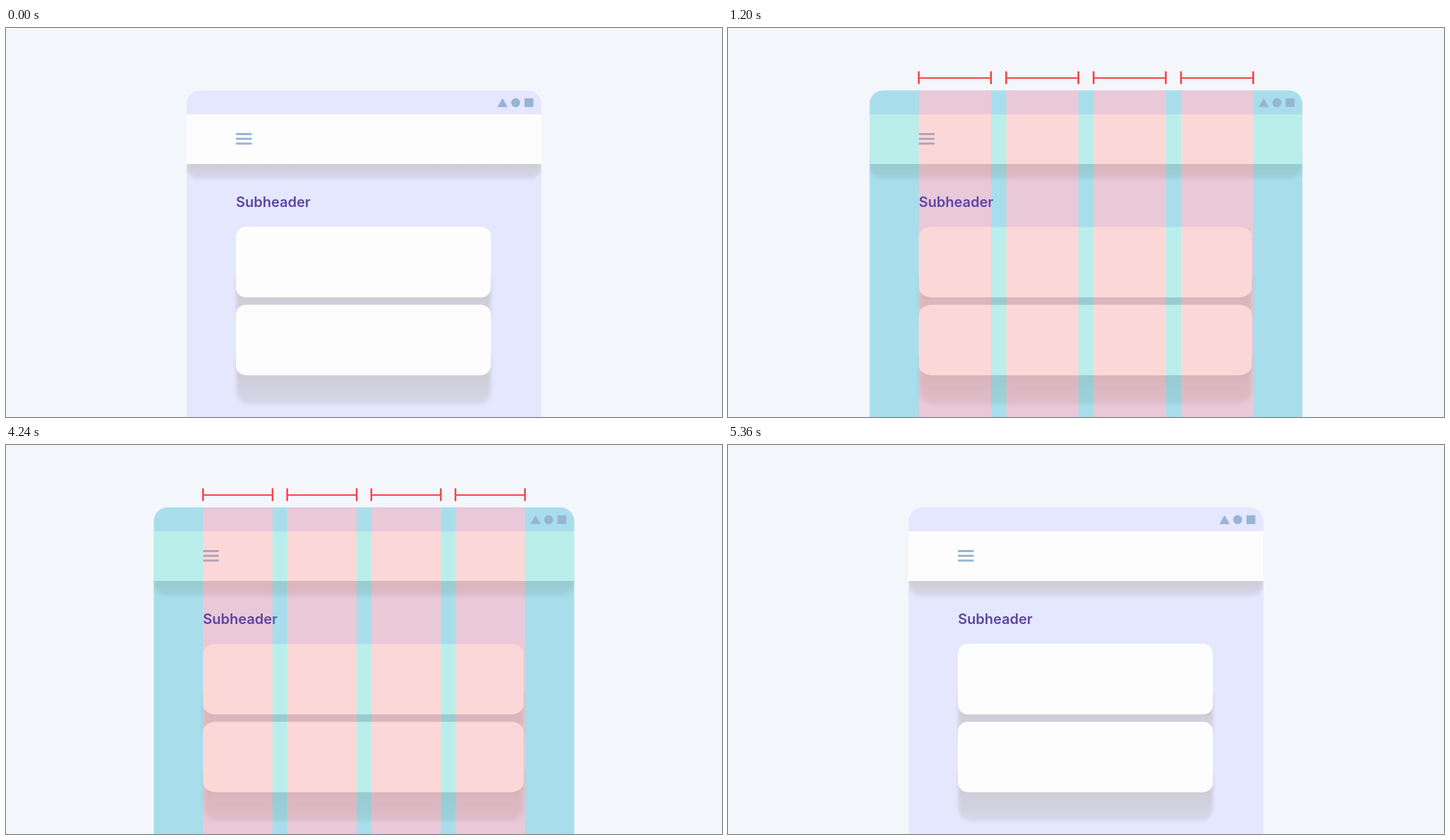
An HTML page that plays this animation: 1015 px wide and 552 px high, repeating every 6 s.

```html
<!DOCTYPE html>
<html lang="en">
<head>
<meta charset="utf-8">
<title>Responsive grid</title>
<style>
  html, body { margin: 0; width: 100%; height: 100%; overflow: hidden; background: #f3f7fb; }
  svg { display: block; width: 1015px; height: 552px; }
  text { font: 600 20px Inter, "Open Sans", sans-serif; fill: #5b45a0; }
  .panel { fill: #e5e7fe; }
  .surface { fill: #fdfdfd; }
  .icon { fill: #98b4d3; }
  .column { fill: rgb(243, 118, 114); fill-opacity: .28; }
  .gap { fill: rgb(14, 199, 185); fill-opacity: .28; }
  .bracket { fill: none; stroke: #f8434a; stroke-width: 2; stroke-linecap: round; }
</style>
</head>
<body>
<svg viewBox="0 0 1015 552">
  <defs>
    <clipPath id="frame"><rect class="full" y="88.5" height="500" rx="20"/></clipPath>
    <linearGradient id="shade" x1="0" y1="0" x2="0" y2="1">
      <stop offset=".45" stop-color="#cecbd6"/>
      <stop offset="1" stop-color="#d5d7e9"/>
    </linearGradient>
    <filter id="soft" x="-10%" y="-30%" width="120%" height="160%">
      <feGaussianBlur stdDeviation="2.5"/>
    </filter>
  </defs>

  <g clip-path="url(#frame)">
    <rect class="full panel" y="88" height="500"/>
    <rect class="full" y="172" height="42" rx="18" fill="url(#shade)" filter="url(#soft)"/>
    <rect class="full surface" y="122.5" height="70.5"/>
  </g>
  <g class="stretch" id="cards"></g>
  <g class="left icon">
    <rect y="149" width="22.5" height="3" rx="1"/>
    <rect y="155.7" width="22.5" height="3" rx="1"/>
    <rect y="162.4" width="22.5" height="3" rx="1"/>
  </g>

  <g clip-path="url(#frame)"><g class="fade"><g class="stretch" id="columns"></g></g></g>
  <g class="left"><text y="254">Subheader</text></g>
  <g clip-path="url(#frame)">
    <g class="fade">
      <g class="stretch" id="gutters"></g>
      <g class="left"><rect class="gap" x="-70" y="88" width="70" height="500"/></g>
      <g class="right"><rect class="gap" x="-70" y="88" width="70" height="500"/></g>
    </g>
  </g>
  <g class="right icon">
    <path d="M-62.5 112.2L-55 99.8L-47.7 112.2Z"/>
    <circle cx="-36.5" cy="106" r="6.4"/>
    <rect x="-24" y="99.8" width="12.6" height="12.4"/>
  </g>
  <g class="fade"><g class="stretch" id="brackets"></g></g>
</svg>

<script>
const LOOP = 6000, STEP = 40, CENTER = 507.5, MARGIN = 70;
const NARROW = 503, WIDE = 703, CONTENT = NARROW - 2 * MARGIN;
const GUTTER = 16.5, COLUMN = (CONTENT - 3 * GUTTER) / 4;

const all = selector => [...document.querySelectorAll(selector)];

function add(id, tag, attrs) {
  const el = document.createElementNS("http://www.w3.org/2000/svg", tag);
  for (const key in attrs) el.setAttribute(key, attrs[key]);
  document.getElementById(id).append(el);
}

for (const y of [282.3, 392.7]) {
  add("cards", "rect", { x: .5, y: y + 60, width: CONTENT - 2, height: 81, rx: 18,
    fill: "url(#shade)", filter: "url(#soft)" });
  add("cards", "rect", { class: "surface", y, width: CONTENT - 1.6, height: 100, rx: 14 });
}

for (let i = 0; i < 4; i++) {
  const x = i * (COLUMN + GUTTER), end = x + COLUMN;
  add("columns", "rect", { class: "column", x, y: 88, width: COLUMN, height: 500 });
  if (i < 3) add("gutters", "rect", { class: "gap", x: end, y: 88, width: GUTTER, height: 500 });
  add("brackets", "path", { class: "bracket", d: `M${x} 62.3V78.7M${x} 71H${end}M${end} 62.3V78.7` });
}

// Cubic bezier easing from (0,0) to (1,1)
function bezier(x1, y1, x2, y2) {
  const at = (a, b, s) => 3 * a * s * (1 - s) ** 2 + 3 * b * s * s * (1 - s) + s ** 3;
  return x => {
    if (x <= 0) return 0;
    if (x >= 1) return 1;
    let lo = 0, hi = 1;
    for (let i = 0; i < 30; i++) {
      const mid = (lo + hi) / 2;
      if (at(x1, x2, mid) < x) lo = mid; else hi = mid;
    }
    return at(y1, y2, lo);
  };
}

const linear = x => Math.min(1, Math.max(0, x));
const widen = bezier(.3, 0, .1, 1);
const shrink = bezier(.4, 0, .2, 1);
const span = (t, start, length, ease) => ease((t - start) / length);

const parts = {
  full: all(".full"), left: all(".left"), right: all(".right"),
  stretch: all(".stretch"), fade: all(".fade")
};
const setAll = (list, name, value) => list.forEach(el => el.setAttribute(name, value));

function draw(t) {
  const grow = span(t, 1000, 670, widen) - span(t, 4000, 660, shrink);
  const grid = span(t, 320, 360, linear) - span(t, 5000, 360, linear);
  const width = NARROW + (WIDE - NARROW) * grow;
  const left = CENTER - width / 2;
  const inner = left + MARGIN;
  setAll(parts.full, "x", left);
  setAll(parts.full, "width", width);
  setAll(parts.left, "transform", `translate(${inner} 0)`);
  setAll(parts.right, "transform", `translate(${left + width} 0)`);
  setAll(parts.stretch, "transform",
    `translate(${inner} 0) scale(${(width - 2 * MARGIN) / CONTENT} 1)`);
  setAll(parts.fade, "opacity", grid);
}

const origin = performance.now();
function tick() {
  const t = (performance.now() - origin) % LOOP;
  draw(Math.floor(t / STEP) * STEP);
  requestAnimationFrame(tick);
}
tick();
</script>
</body>
</html>
```
